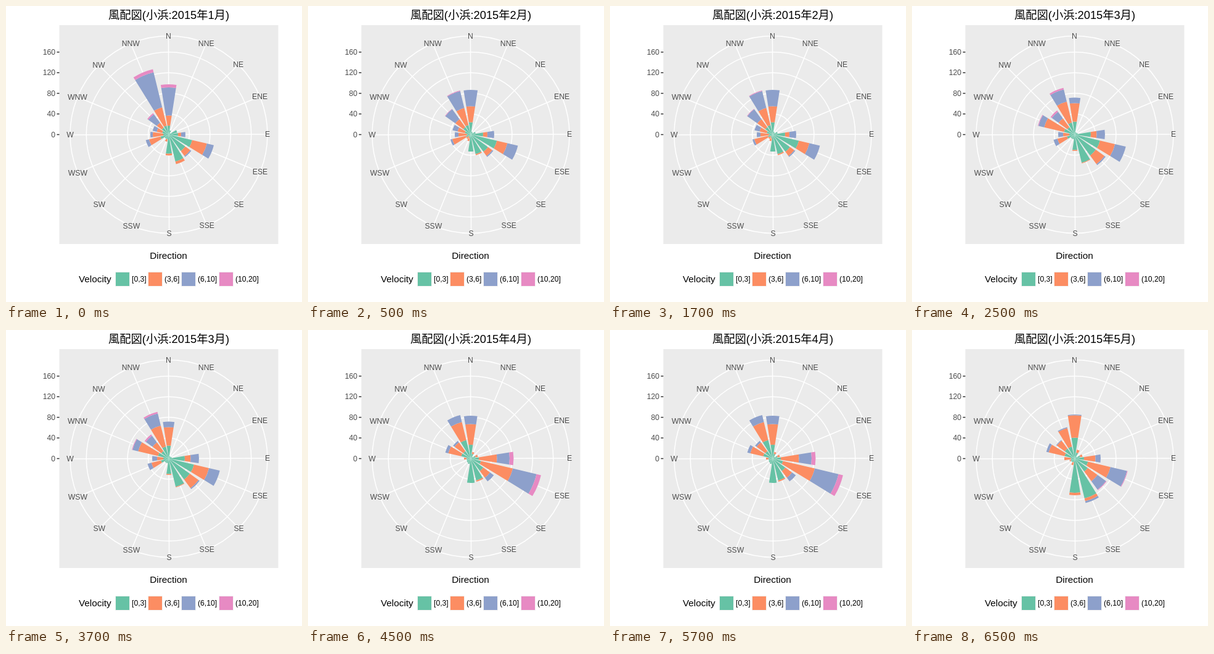
Animation of 480 by 480 pixels, one loop 8000 ms. Source, as an HTML page:

```html
<!DOCTYPE html>
<html lang="ja">
<head>
<meta charset="utf-8">
<title>風配図</title>
<style>
  html, body { margin: 0; width: 100%; height: 100%; overflow: hidden; background: #fff; }
  svg { display: block; width: 100vw; height: 100vh; }
  text { font-family: "Liberation Sans", "Noto Sans CJK JP", "Noto Sans CJK", sans-serif; font-size: 12.2px; }
</style>
</head>
<body>
<svg id="chart" viewBox="0 0 480 480"></svg>
<script>
const svg = document.getElementById('chart');
const CX = 264, CY = 208.5, RIM = 160, UNIT = 0.836;
const TILT = -0.0036, HALF = Math.PI / 20;
const DIRS = 'N NNE NE ENE E ESE SE SSE S SSW SW WSW W WNW NW NNW'.split(' ');
const COLORS = ['#66c2a5', '#fc8d62', '#8da0cb', '#e78ac3'];

// Outer radius of each stacked velocity class, by direction
const months = [
  { N: [14.5, 31, 76.5, 81.5], NNE: [7], NE: [3], ENE: [14], E: [15, 20, 27],
    ESE: [39, 63.5, 75], SE: [33, 43, 45], SSE: [45, 49.5], S: [31, 34],
    SSW: [8, 12], SW: [8], WSW: [14, 33, 38.5], W: [9, 26, 30],
    WNW: [11, 20, 27], NW: [14, 24, 41, 43], NNW: [15, 45.5, 104, 109] },
  { N: [20, 46, 72.5], NNE: [5], NE: [4], ENE: [8], E: [20, 27, 38],
    ESE: [43.5, 61, 78.5], SE: [34.5, 43, 45], SSE: [32.5, 34.5], S: [27.5],
    SSW: [6, 11], SW: [4, 9], WSW: [8, 31, 34], W: [6, 20, 26],
    WNW: [10, 22, 30.5], NW: [15, 31, 51, 51.7], NNW: [16, 44.5, 72.6, 73.5] },
  { N: [21, 51, 60], NNE: [4], NE: [4], ENE: [5], E: [26, 35.5, 49],
    ESE: [42, 67, 85], SE: [42, 59.5, 61.5], SSE: [47, 48], S: [25, 26.5],
    SSW: [8], SW: [8], WSW: [13, 29, 35.5], W: [9, 19, 27],
    WNW: [18, 51, 60.5, 61.5], NW: [15, 32.5, 46, 48.5], NNW: [20, 55, 75.5, 78] },
  { N: [22.5, 56, 69.5], NNE: [8, 11], NE: [4], ENE: [8, 12], E: [13, 42.5, 63, 69.5],
    ESE: [17, 70, 109.5, 117], SE: [25, 38.5, 46], SSE: [36.5, 38.5], S: [39.5],
    SSW: [9], SW: [8], WSW: [7], W: [7, 11],
    WNW: [16, 37.5, 42.5], NW: [15, 32.5, 35.5], NNW: [31, 61, 72.5] },
  { N: [34, 70.2, 71.5], NNE: [10, 15], NE: [4], ENE: [9, 13], E: [15, 33.5, 42],
    ESE: [22, 59.5, 87, 88], SE: [26, 45.5, 62.5, 63.5], SSE: [66.5, 71, 74], S: [55.5, 59.5],
    SSW: [6, 11], SW: [7], WSW: [7, 9], W: [6, 17],
    WNW: [17, 43.5, 47.5], NW: [20, 36, 37.2], NNW: [20, 51, 52.5] }
];

function add(tag, attrs, parent = svg) {
  const el = document.createElementNS('http://www.w3.org/2000/svg', tag);
  for (const key in attrs) el.setAttribute(key, attrs[key]);
  return parent.appendChild(el);
}

function label(str, x, y, attrs) {
  const el = add('text', { x, y, ...attrs });
  el.textContent = str;
  return el;
}

const square = (x, y, size, fill) => add('rect', { x, y, width: size, height: size, fill });
const angle = i => i * Math.PI / 8 + TILT;
const polar = (r, a) => [CX + r * Math.sin(a), CY - r * Math.cos(a)];

function wedge(r0, r1, a) {
  const arc = (r, sweep, to) => `A${r} ${r} 0 0 ${sweep} ${polar(r, to)}`;
  return `M${polar(r0, a - HALF)}L${polar(r1, a - HALF)}${arc(r1, 1, a + HALF)}` +
    `L${polar(r0, a + HALF)}${r0 ? arc(r0, 0, a - HALF) : ''}Z`;
}

// Panel and grid
square(86.5, 31, 355, '#ebebeb');
const grid = add('g', { stroke: '#fff', 'stroke-width': 1.5, fill: 'none' });
for (const r of [40, 80, 120, 160].map(v => v * UNIT).concat(RIM))
  add('circle', { cx: CX, cy: CY, r }, grid);
DIRS.forEach((_, i) => {
  const [x2, y2] = polar(RIM, angle(i));
  add('line', { x1: CX, y1: CY, x2, y2 }, grid);
});

// One group of bars per month
const roses = months.map(data => {
  const group = add('g', {});
  DIRS.forEach((dir, i) => {
    let inner = 0;
    data[dir].forEach((outer, k) => {
      add('path', { d: wedge(inner, outer, angle(i)), fill: COLORS[k] }, group);
      inner = outer;
    });
  });
  return group;
});

// Axes
const middle = { 'text-anchor': 'middle' };
DIRS.forEach((dir, i) => {
  const [x, y] = polar(RIM, angle(i));
  label(dir, x, y + 4.3, { ...middle, fill: '#4d4d4d' });
});
for (let v = 0; v <= 160; v += 40) {
  const y = CY - v * UNIT;
  label(v, 80, y + 4.3, { 'text-anchor': 'end', fill: '#4d4d4d' });
  add('line', { x1: 82.5, x2: 86.5, y1: y, y2: y, stroke: '#333', 'stroke-width': 1.5 });
}
const title = label('', CX, 21, { ...middle, style: 'font-size:18.3px' });
label('Direction', 263.5, 410, { ...middle, style: 'font-size:15.3px' });

// Legend
label('Velocity', 118, 448, { style: 'font-size:15.3px' });
[['[0,3]', 177], ['(3,6]', 230], ['(6,10]', 284], ['(10,20]', 345]].forEach(([name, x], k) => {
  square(x, 431, 24, '#f2f2f2');
  square(x + 1, 432, 22, COLORS[k]);
  label(name, x + 27, 447);
});

let shown = -1;
function draw(now) {
  const month = Math.floor((now % 8000 + 1500) / 2000);
  if (month !== shown) {
    shown = month;
    roses.forEach((g, i) => g.setAttribute('display', i === month ? 'inline' : 'none'));
    title.textContent = `風配図(小浜:2015年${month + 1}月)`;
  }
  requestAnimationFrame(() => draw(performance.now() - start));
}
const start = performance.now();
draw(0);
</script>
</body>
</html>
```
